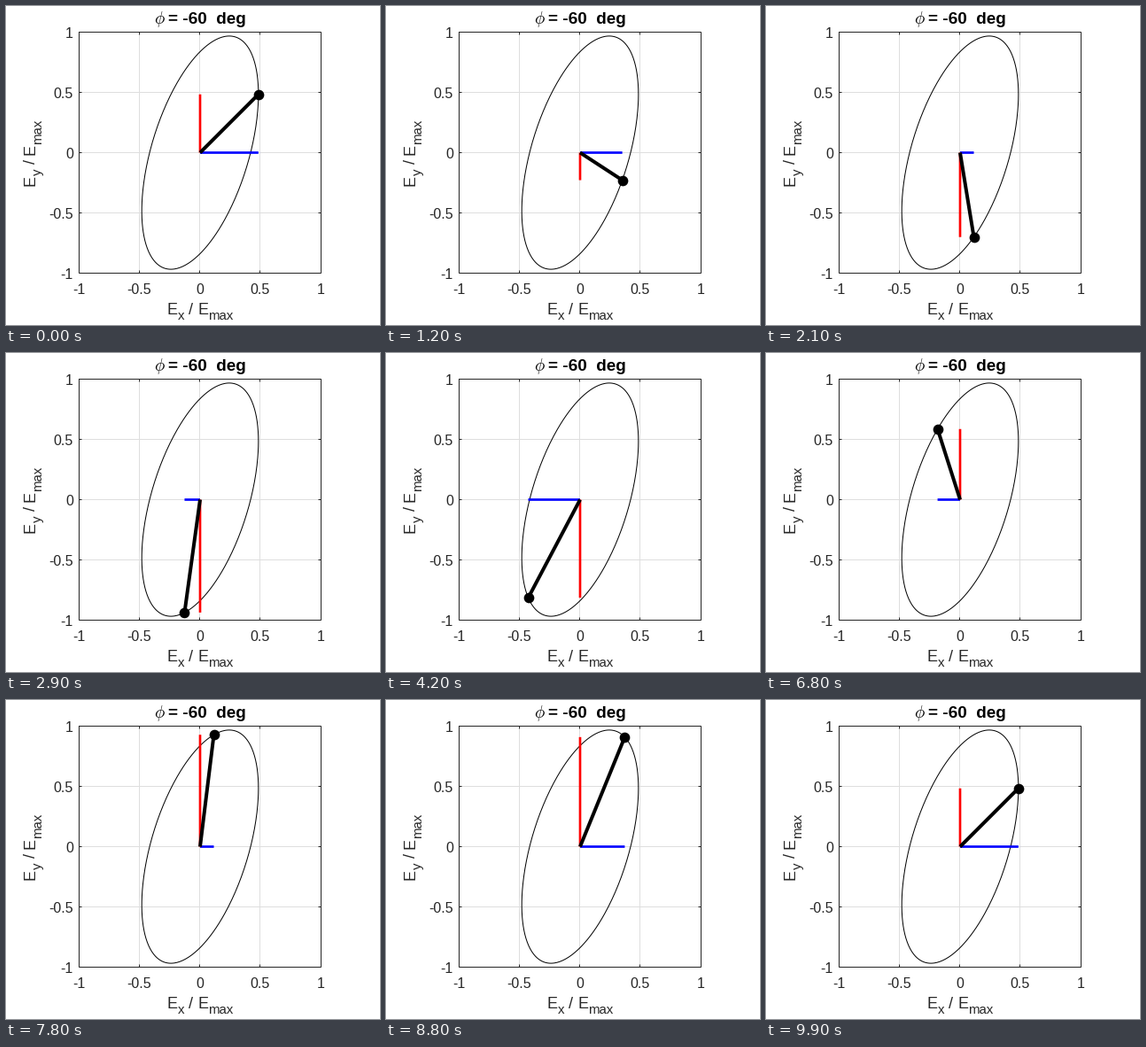
These frames come from a looping animation (422x360 px, 10000 ms). A matplotlib script:

```python
import numpy as np
import matplotlib.pyplot as plt
from matplotlib.animation import FuncAnimation

W, H, DPI = 422, 360, 100
PT = 72 / DPI               # points per pixel
CX, CY, HALF = 219, 165.5, 136.5
FRAMES = 100
PHI = -60
GRAY = "#262626"

plt.rcParams["font.family"] = "Liberation Sans"
fig = plt.figure(figsize=(W / DPI, H / DPI), dpi=DPI, facecolor="white")
ax = fig.add_axes([0, 0, 1, 1])
ax.set(xlim=(0, W), ylim=(H, 0))
ax.axis("off")


def field(t):
    """Both field components at phase t, scaled to the peak amplitude."""
    a, b, d = 1.0, 2.0, np.radians(PHI)
    s = a * a + b * b
    peak = np.sqrt((s + np.sqrt(s * s - (2 * a * b * np.sin(d)) ** 2)) / 2)
    return a * np.cos(t) / peak, b * np.cos(t - d) / peak


def to_px(x, y):
    return CX + HALF * x, CY - HALF * y


def line(xs, ys, color, width, z=1, **kw):
    return ax.plot(xs, ys, color=color, lw=width * PT, zorder=z, snap=False,
                   solid_capstyle="butt", **kw)[0]


def label(x, y, s, size, color=GRAY, ha="left", **kw):
    ax.text(x, y, s, fontsize=size * PT, color=color, ha=ha, va="baseline",
            rotation_mode="anchor", **kw)


def axis_label(x, y, sub, up=False):
    """Draw 'E_sub / E_max' piece by piece along the reading direction."""
    big, small, drop = 18, 15, 7
    pieces = [(0, "E", big, 0), (12, sub, small, drop), (24.5, "/", big, 0),
              (34.5, "E", big, 0), (46.5, "max", small, drop)]
    for along, s, size, d in pieces:
        px, py = (x + d, y - along) if up else (x + along, y + d)
        label(px, py, s, size, rotation=90 if up else 0)


# Grid, box and ticks
left, top, right, bottom = 82.5, 29.5, 355.5, 301.5
xs = [left, 150.5, 218.5, 286.5, right]
ys = [bottom, 233.5, CY, 97.5, top]
for x in xs[1:-1]:
    line([x, x], [top, bottom], "#dedede", 1)
    line([x, x], [top, top + 3], GRAY, 1, 2)
    line([x, x], [bottom - 3, bottom], GRAY, 1, 2)
for y in ys[1:-1]:
    line([left, right], [y, y], "#dedede", 1)
    line([left, left + 3], [y, y], GRAY, 1, 2)
    line([right - 3, right], [y, y], GRAY, 1, 2)
line([left, right, right, left, left], [top, top, bottom, bottom, top],
     GRAY, 1, 2, solid_joinstyle="miter")

for x, y, s in zip(xs, ys, ["-1", "-0.5", "0", "0.5", "1"]):
    label(x, 325, s, 16, ha="center")
    label(76, y + 6, s, 16, ha="right")

axis_label(181.6, 347.5, "x")
axis_label(33, 203, "y", up=True)
label(166.6, 20, r"$\phi$", 19, "black", math_fontfamily="cm")
label(183.2, 20, f"= {PHI}  deg", 19, "black", weight="bold")

# Polarisation ellipse and moving vectors
line(*to_px(*field(np.linspace(0, 2 * np.pi, 361))), "black", 1, 3)
blue = line([], [], "blue", 2.67, 4)
red = line([], [], "red", 2.67, 4)
arm = line([], [], "black", 4, 5)
dot = line([], [], "black", 1, 6, marker="o", ms=11.7 * PT, mew=0)


def draw(i):
    x, y = to_px(*field(2 * np.pi * i / (FRAMES - 1)))
    blue.set_data([CX, x], [CY, CY])
    red.set_data([CX, CX], [CY, y])
    arm.set_data([CX, x], [CY, y])
    dot.set_data([x], [y])
    return blue, red, arm, dot


anim = FuncAnimation(fig, draw, frames=FRAMES, interval=100, repeat=True,
                     repeat_delay=0)
plt.show()
```
